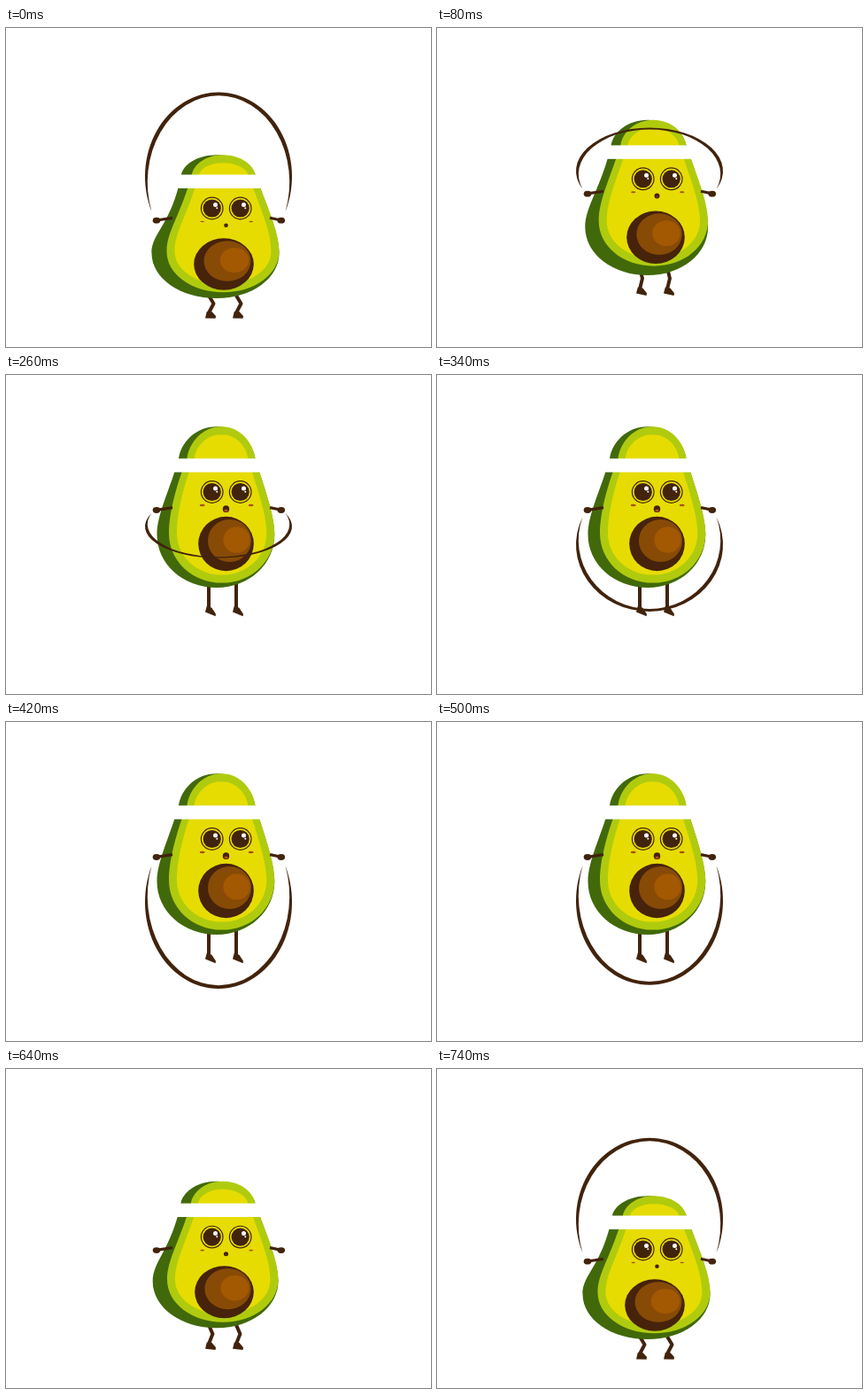
Recreate the animation shown at these times as an HTML page with a canvas. Size 480 by 360 pixels, loop 0.76 s.

```html
<!DOCTYPE html>
<html lang="en">
<head>
<meta charset="utf-8">
<title>Skipping avocado</title>
<style>
html, body { margin: 0; width: 100%; height: 100%; overflow: hidden; background: #fff; }
canvas { display: block; width: 480px; height: 360px; }
</style>
</head>
<body>
<canvas id="stage" width="480" height="360"></canvas>
<script>
const g = document.getElementById('stage').getContext('2d');
const LOOP = 760, STEP = 20, TURN = 500;
const BROWN = '#42230c', SKIN = '#41690a', LIME = '#b0cb0d', FLESH = '#e6dc02';
const ROPE = new Path2D('M-75.5-10A83 95 0 1 1 75.5-10A80.2 97.8 0 1 0-75.5-10Z');

const mix = (a, b, p) => a + (b - a) * p;
const easeOut = x => Math.sin(Math.PI / 2 * Math.min(1, x));

// Height of the jump: 0 crouched, 1 in the air.
function lift(t) {
  return t < TURN ? easeOut(t / 260) : 1 - easeOut((t - TURN) / 235);
}

// Vertical scale of the rope: 1 overhead, 0 edge-on, negative below.
function swing(t) {
  if (t < 200) return Math.pow(1 - t / 200, 1.3);
  if (t < TURN) return -1.06 * Math.sin(Math.PI / 2 * (t - 200) / 260);
  return -Math.cos(Math.PI * Math.pow((t - TURN) / (LOOP - TURN), 1.12));
}

function oval(color, x, y, rx, ry = rx) {
  g.fillStyle = color;
  g.beginPath();
  g.ellipse(x, y, rx, ry, 0, 0, 7);
  g.fill();
}

function line(width, ...pts) {
  g.strokeStyle = BROWN;
  g.lineWidth = width;
  g.lineJoin = 'round';
  g.beginPath();
  pts.forEach(([x, y]) => g.lineTo(x, y));
  g.stroke();
}

// One layer of the fruit; rind moves the left side in, inset shrinks all sides.
function pear(color, p, low, rind, inset) {
  const c = .56;
  const topX = 238 + .4 * rind, baseX = 238 + .45 * rind;
  const neck = mix(165.3, 94.3, p), top = neck - mix(22, 36, p) + inset;
  const neckL = mix(198, 195, p) + .7 * rind + .9 * inset;
  const neckR = 281.5 - .9 * inset;
  const wideL = mix(164.5, 170.5, p) + rind + inset;
  const wideR = mix(308.5, 303.3, p) - inset;
  const wideY = mix(254, 180, low) - .12 * rind;
  const base = mix(305, 240, low) - .4 * rind - inset;
  const brow = mix(neck, top, .5), hip = mix(wideY, base, c);

  g.fillStyle = color;
  g.beginPath();
  g.moveTo(topX, top);
  g.bezierCurveTo(mix(topX, neckL, c), top, mix(neckL, topX, .06), brow, neckL, neck);
  g.bezierCurveTo(mix(187, 185, p) + .6 * rind + .9 * inset, mix(222, 130, p) - .6 * rind,
    wideL, wideY - 23, wideL, wideY);
  g.bezierCurveTo(wideL, hip, mix(baseX, wideL, c), base, baseX, base);
  g.bezierCurveTo(mix(baseX, wideR, c), base, wideR, hip, wideR, wideY);
  g.bezierCurveTo(wideR, wideY - 23, mix(294, 289, p) - .9 * inset, mix(200, 120, p), neckR, neck);
  g.bezierCurveTo(mix(neckR, topX, .06), brow, mix(topX, neckR, c), top, topX, top);
  g.fill();
}

function seed(low) {
  const x = mix(246, 248.5, low), y = mix(266.5, 190.5, low);
  const sx = mix(1.09, 1.01, low), sy = mix(.94, .99, low);
  const ring = (color, dx, dy, r) => oval(color, x + dx, y + dy, r * sx, r * sy);
  ring('#46230a', 0, 0, 31);
  ring('#874b06', 4, -3.5, 24.3);
  ring('#a35802', 12, -4.5, 15);
}

function rope(k, handY) {
  g.save();
  g.translate(240, handY);
  g.scale(1, k);
  g.fillStyle = BROWN;
  g.fill(ROPE);
  g.restore();
}

function leg(hip, p) {
  const ankle = mix(320, 262.5, p), bend = 1 - p;
  line(4, [hip, mix(302, 234, p)], [hip + 5.5 * bend, mix(311, 250, p)], [hip, ankle + 1.5]);
  g.save();
  g.translate(hip, ankle);
  g.transform(1, .4 * p, 0, 1, 0, -p); // toes drop in the air
  g.fillStyle = BROWN;
  g.fill(new Path2D('M-2.2 0H3.4L8 5L7.6 7.8L-4 7.5Z'));
  g.restore();
}

function face(p) {
  const y = mix(203.5, 132, p), mouth = y + 19.2;
  for (const side of [-1, 1]) {
    const x = 248.7 + 16 * side;
    g.strokeStyle = BROWN;
    g.lineWidth = 1.2;
    g.beginPath();
    g.arc(x, y, 12.3, 0, 7);
    g.stroke();
    oval(BROWN, x, y, 10.1);
    oval('#fff', x + 3.8, y - 4, 2.5);
    oval('#fff', x + 5.6, y - .2, 1);
    oval('#a8500c', 249.2 + 27.5 * side, y + 15, mix(2.3, 3, p), mix(.8, 1.2, p));
  }
  oval(BROWN, 248.5, mouth, mix(2.3, 3.7, p), mix(2.2, 3.9, p));
  oval('#b8501c', 248.5, mouth + 1.9 * p, 2.2 * p, 1.5 * p);
}

function arm(side, handY) {
  const hand = 240.4 + 70.4 * side;
  line(3.2, [243 + 55 * side, handY - 2.7], [hand, handY]);
  oval(BROWN, hand, handY + .2, 4.3, 3.4);
}

function draw(t) {
  const p = lift(t), k = swing(t);
  const low = t < 260 ? Math.pow(p, 1.2) : p; // the heavy base lags on take-off
  const handY = mix(217, 152.3, p), rind = mix(17, 13.5, p);

  g.fillStyle = '#fff';
  g.fillRect(0, 0, 480, 360);

  if (t > TURN) rope(k, handY);
  leg(229, p);
  leg(260, p);

  pear(SKIN, p, low, 0, 0);
  pear(LIME, p, p, rind, 0);
  pear(FLESH, p, p, rind, 9);
  g.fillStyle = '#fff';
  g.fillRect(180, mix(165.5, 94.3, p), 120, 15.4);

  seed(low);
  face(p);
  arm(-1, handY);
  arm(1, handY);
  if (t <= TURN) rope(k, handY);
}

const start = performance.now();
function tick() {
  const t = (performance.now() - start) % LOOP;
  draw(Math.floor(t / STEP) * STEP);
  requestAnimationFrame(tick);
}
tick();
</script>
</body>
</html>
```
